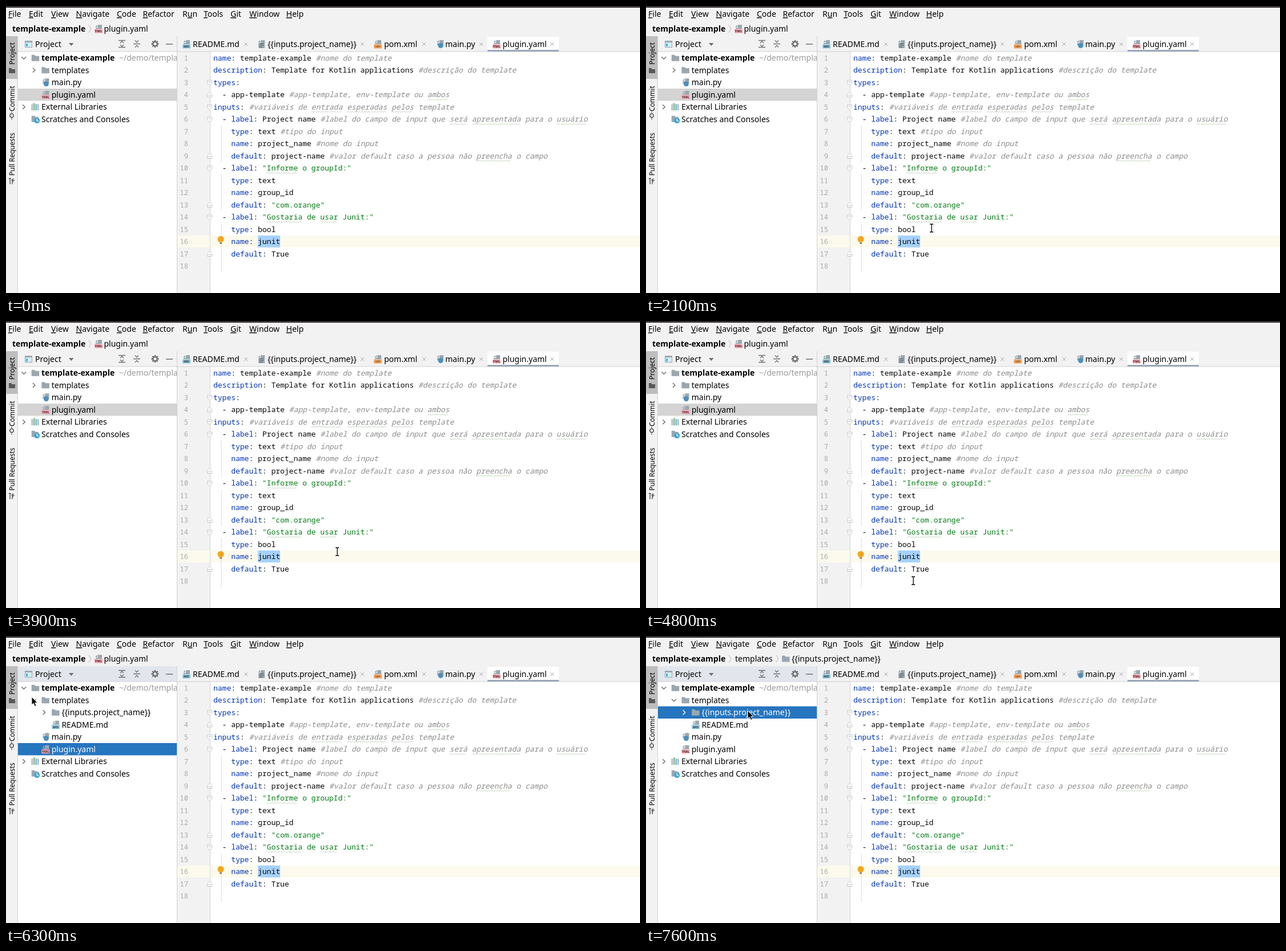
An HTML page for the animation above (8000 ms loop, 1110 by 504 pixels).

```html
<!DOCTYPE html>
<html lang="pt">
<head>
<meta charset="utf-8">
<style>
html, body { margin: 0; width: 100%; height: 100%; overflow: hidden; background: #fff; }
svg { display: block; }
text { font: 14px "Noto Sans", "Open Sans", sans-serif; white-space: pre; }
.bold { font-weight: 700; }
.side { font-size: 12px; }
.tag { font: 700 6px "Open Sans", sans-serif; }
.code { font: 13px "Noto Sans Mono", "DejaVu Sans Mono", monospace; }
.note { font-style: italic; }
.num { font-size: 12px; text-anchor: end; }
.hot { text-decoration: underline; }
</style>
</head>
<body>
<svg id="stage" width="1110" height="504" viewBox="0 0 1110 504"></svg>
<script>
const LOOP = 8000, STEP = 100, ROW = 21.5;
const GREY = '#6e6e6e', ICON = '#9aa7b0', PANEL = '#f2f2f2', EDGE = '#d1d1d1';

const rect = (x, y, w, h, color, more = '') =>
  `<rect x="${x}" y="${y}" width="${w}" height="${h}" fill="${color}" ${more}/>`;
const text = (x, y, s, color = '#000', cls = '') =>
  `<text x="${x}" y="${y}" fill="${color}" class="${cls}">${s}</text>`;
const fill = (d, color) => `<path d="${d}" fill="${color}"/>`;
const line = (d, color = GREY, width = 1.2) =>
  `<path d="${d}" fill="none" stroke="${color}" stroke-width="${width}"/>`;
const dot = (x, y, r, color) => `<circle cx="${x}" cy="${y}" r="${r}" fill="${color}"/>`;
const ring = (x, y, r, color, width) =>
  `<circle cx="${x}" cy="${y}" r="${r}" fill="none" stroke="${color}" stroke-width="${width}"/>`;

// Icons: x is the left edge, y the vertical centre
const folder = (x, y) => fill(`M${x},${y - 5.5}h5l2,2h6.5v9h-13.5z`, ICON);
const page = (x, y, h) =>
  fill(`M${x + 6},${y - 7}h7v${h}h-11V${y - 2}h4zM${x + 5},${y - 7}v4h-4z`, ICON);
const tagged = (tag, color) => (x, y) =>
  page(x, y, 7) + rect(x, y + 0.5, 14, 7, color) +
  `<text x="${x + 7}" y="${y + 6.2}" fill="#4a3033" class="tag" text-anchor="middle">${tag}</text>`;
const yml = tagged('YML', '#f5a3ad'), md = tagged('MD', '#86cde8'), xml = tagged('&lt;/&gt;', '#f2a15c');
const py = (x, y) => page(x, y, 9) + dot(x + 8, y + 2.5, 4.5, '#4b8fbd');
const txt = (x, y) => page(x - 1, y, 14) + line(`M${x + 3},${y - 1}h7m-7,3h7m-7,3h5`, '#4f565c', 1);
const library = (x, y) =>
  rect(x, y - 5, 2, 11, ICON) + rect(x + 3.5, y - 7, 2, 13, '#62a96b') +
  rect(x + 7, y - 5, 2, 11, '#40a5cf') + rect(x + 10.5, y - 5, 2, 11, ICON);
const scratch = (x, y) =>
  fill(`M${x},${y - 6}h5l2,2h5v9h-12z`, ICON) + dot(x + 9.5, y + 2.5, 5, '#3ea6d2') +
  line(`M${x + 9.5},${y - 1}v4h3`, '#fff');
const right = (x, y, color = GREY) => line(`M${x - 2},${y - 4}l4,4l-4,4`, color, 1.4);
const down = (x, y, color = GREY) => line(`M${x - 4},${y - 2}l4,4l4,-4`, color, 1.4);
const crumb = x => line(`M${x - 2},33.5l4,6.5l-4,6.5`, '#b5b5b5', 1);
const close = x => line(`M${x - 3},64l6,6m0,-6l-6,6`, '#a9a9a9', 1);

const MENU = [['_File', 4], ['_Edit', 40], ['_View', 79], ['_Navigate', 122.5], ['_Code', 194],
  ['_Refactor', 239.5], ['R_un', 309], ['_Tools', 346], ['_Git', 393], ['_Window', 426], ['_Help', 490.5]];
const TABS = [[md, 309, 'README.md', 327, 420], [txt, 441, '{{inputs.project_name}}', 458, 624],
  [xml, 644, 'pom.xml', 662, 732], [py, 753, 'main.py', 769, 832], [yml, 852, 'plugin.yaml', 869.5, 956]];

// Words between tildes carry a spelling wave
const CODE = `name: template-example #nome do template
description: Template for Kotlin applications #descrição do template
types:
  - app-template #app-template, env-template ou ~ambos~
inputs: #variáveis de ~entrada~ ~esperadas~ ~pelos~ template
  - label: Project name #label do campo de input que ~será~ ~apresentada~ para o ~usuário~
    type: text #tipo do input
    name: project_name #nome do input
    default: project-name #valor default caso a pessoa não ~preencha~ o campo
  - label: "~Informe~ o groupId:"
    type: text
    name: group_id
    default: "com.orange"
  - label: "~Gostaria~ de ~usar~ Junit:"
    type: bool
    name: junit
    default: True
`.split('\n');

function codeLine(src, i) {
  const y = 95.9 + ROW * i, at = col => 363 + 7.8 * col;
  let out = text(319, y, i + 1, '#a9a9a9', 'code num');
  const plain = src.replace(/~/g, '');
  let marks = 0;
  for (const m of src.matchAll(/~([^~]+)~/g)) {
    const n = Math.floor(m[1].length * 7.8 / 4);
    out += line(`M${at(m.index - marks)},${y + 5}` + 'l2,-2l2,2'.repeat(n), '#b3c9ae', 0.8);
    marks += 2;
  }
  const [, lead, key, value, note] = plain.match(/^( *(?:- )?)(\w+(?=:))?([^#]*)(#.*)?$/);
  let col = 0;
  const put = (s = '', color, cls = '') => {
    const skip = s.length - s.trimStart().length;
    if (s.trim()) out += text(at(col + skip), y, s.trim(), color, 'code ' + cls);
    col += s.length;
  };
  const quote = value.includes('"') ? value.indexOf('"') : value.length;
  put(lead, '#080808');
  put(key, '#0033b3');
  put(value.slice(0, quote), '#080808');
  put(value.slice(quote), '#067d17');
  put(note, '#8c8c8c', 'note');
  return out;
}

function fold(row, dir) {
  const y = 91.5 + ROW * (row - 1);
  return `<path d="M352.5,${y - 4 * dir}h8v${5 * dir}l-4,${4 * dir}l-4,${-4 * dir}z" fill="#fff" stroke="#c6c6c6"/>` +
    line(`M354.5,${y - dir}h4`, '#b5b5b5', 1);
}

function editor() {
  const guide = (a, b) => line(`M377,${80.5 + ROW * a}V${80.5 + ROW * b}`, '#dcdcdc', 1);
  return rect(299, 80, 811, 424, '#fff') + rect(300, 80, 57, 424, PANEL) +
    rect(300, 403, 810, 21, '#fcfaed') + line('M357.5,80V504', '#d6d6d6', 1) +
    guide(6, 9) + guide(10, 13) + guide(14, 18) +
    rect(441, 403, 39, 21, '#a6d2ff') +
    [3, 5, 6, 10, 14].map(r => fold(r, 1)).join('') + [4, 9, 13, 17].map(r => fold(r, -1)).join('') +
    CODE.map(codeLine).join('') +
    dot(376, 409.5, 5.5, '#f2a51f') + rect(373.5, 412, 5, 3, '#f2a51f') + rect(374, 415.5, 4, 2, '#7a6b4e');
}

function tabs() {
  return rect(299, 53, 811, 27, PANEL) + rect(843, 54, 125, 26, '#fff') +
    rect(299, 79.5, 811, 1, EDGE) + rect(843, 77, 125, 3, '#9ca7b8') +
    TABS.map(([icon, ix, s, x, cx]) => icon(ix, 67) + text(x, 72, s) + close(cx)).join('') +
    rect(299, 53, 1, 451, EDGE);
}

function sidebar() {
  const label = (y, s) => `<text class="side" transform="translate(15 ${y}) rotate(-90)">${s}</text>`;
  return rect(0, 53, 20, 451, PANEL) + rect(0, 53, 20, 75, '#bdbdbd') +
    label(103, 'Project') + fill('M5,109h4l1.5,2h5.5v7h-11z', '#595959') +
    label(185, 'Commit') + line('M10,185v4m0,7v4') + ring(10, 192.5, 3.2, '#595959', 1.5) +
    label(298, 'Pull Requests') + line('M7,302v11m-2,-10h4m2,10v-7h4m-2,-3l-3,3l3,3', '#595959', 1.4) +
    rect(20, 53, 1, 451, EDGE);
}

function header(active) {
  const gear = Array.from({ length: 8 }, (_, i) =>
    rect(259.7, 60, 2.6, 3, GREY, `transform="rotate(${i * 45} 261 66.5)"`)).join('');
  return rect(21, 53, 278, 27, active ? '#e2e6ec' : PANEL) + rect(21, 79.5, 278, 1, EDGE) +
    rect(33.5, 61.5, 12, 11, '#d5edf7', `stroke="${ICON}"`) + rect(33, 61, 13, 3, ICON) + rect(35, 66, 3, 5, '#40b6e0') +
    text(51, 71.5, 'Project') + fill('M110,65h8.5l-4.25,5z', GREY) +
    line('M197,60.5h12m-12,12h12M200,65l3,-3l3,3m-6,3l3,3l3,-3', GREY, 1.4) +
    line('M223,66.5h12M226,60.5l3,3l3,-3m-6,12l3,-3l3,3', GREY, 1.4) +
    gear + ring(261, 66.5, 3.5, GREY, 2) + line('M280,67h12', GREY, 1.5);
}

function tree(open, picked) {
  const rows = [
    [1, folder, 'template-example', down],
    [2, folder, 'templates', open ? down : right],
    ...(open ? [[3, folder, '{{inputs.project_name}}', right], [3, md, 'README.md']] : []),
    [2, py, 'main.py'],
    [2, yml, 'plugin.yaml'],
    [1, library, 'External Libraries', right],
    [1, scratch, 'Scratches and Consoles']
  ];
  return rect(21, 80, 278, 424, '#fff') + rows.map(([depth, icon, name, arrow], i) => {
    const y = 91.3 + ROW * i, x = 27 + 17.7 * depth, on = name === picked;
    const ink = on && open ? '#fff' : '#000';
    return (on ? rect(20, y - 10.8, 279, ROW, open ? '#2675bf' : '#d4d4d4') : '') +
      (arrow ? arrow(x - 13.5, y, on ? '#fff' : GREY) : '') + icon(x, y) +
      text(x + 17.3, y + 5, name, ink, i ? '' : 'bold') +
      (i ? '' : text(198, y + 5, '~/demo/template-example', '#999'));
  }).join('');
}

function topBars(active, deep) {
  return rect(0, 0, 1110, 3, '#3a353a') + (active ? rect(0, 2, 1110, 1, '#262226') : '') +
    rect(0, 3, 1110, 50, PANEL) + rect(0, 53, 1110, 1, EDGE) +
    MENU.map(([s, x]) => text(x, 19, s.replace(/_(.)/, '<tspan class="hot">$1</tspan>'))).join('') +
    text(11, 45, 'template-example', '#000', 'bold') + crumb(147) +
    (deep
      ? text(156, 45, 'templates') + crumb(230) + folder(238, 40) + text(255, 45, '{{inputs.project_name}}')
      : yml(155, 40) + text(171.5, 45, 'plugin.yaml'));
}

// Pointer bursts: start time, then one x,y pair per step; it rests in between
const MOVES = [
  [500, 71, 43, 160, 110, 310, 250, 420, 400, 468, 484, 500, 474, 506, 435, 492, 404, 472, 394],
  [1500, 451, 404, 457, 424],
  [2100, 500, 390, 537, 361],
  [2400, 500, 335, 440, 307, 395, 315, 378, 337],
  [2900, 375, 366, 405, 415, 448, 453],
  [3300, 439, 440, 460, 410, 505, 380, 551, 369],
  [3800, 570, 380, 580, 405, 570, 440, 535, 470, 490, 480, 440, 473, 400, 458, 394, 442, 414, 431],
  [4700, 440, 442, 468, 456],
  [5100, 390, 390, 240, 260, 90, 150, 20, 108],
  [5600, 16, 102, 24, 102, 36, 104, 45, 107],
  [6700, 90, 122, 148, 140, 184, 142, 178, 131]
];

function pointer(t) {
  const burst = MOVES.filter(m => m[0] <= t).pop();
  if (!burst) return '';
  const [start, ...p] = burst;
  const i = Math.min((t - start) / STEP, p.length / 2 - 1) * 2;
  const [x, y] = [p[i], p[i + 1]];
  if (x < 300)
    return `<path d="M${x},${y}v14l3.2,-2.9l2.3,5.3l2.5,-1.1l-2.3,-5h4.2z" fill="#000" stroke="#fff" stroke-width="0.9"/>`;
  const beam = `M${x - 3},${y - 7}h2l1,1l1,-1h2M${x - 3},${y + 7}h2l1,-1l1,1h2M${x},${y - 6}v12`;
  return line(beam, '#fff', 3) + line(beam, '#000', 1.3);
}

const FIXED = editor() + tabs() + sidebar();

function scene(t) {
  const open = t >= 6300;
  const picked = t >= 7200 ? '{{inputs.project_name}}' : 'plugin.yaml';
  return topBars(open, t >= 7600) + tree(open, picked) + header(open) + FIXED + pointer(t);
}

const stage = document.getElementById('stage');
const begin = performance.now();
let shown = -1;
function draw() {
  const t = Math.floor((performance.now() - begin) % LOOP / STEP) * STEP;
  if (t !== shown) stage.innerHTML = scene(shown = t);
  requestAnimationFrame(draw);
}
draw();
</script>
</body>
</html>
```
